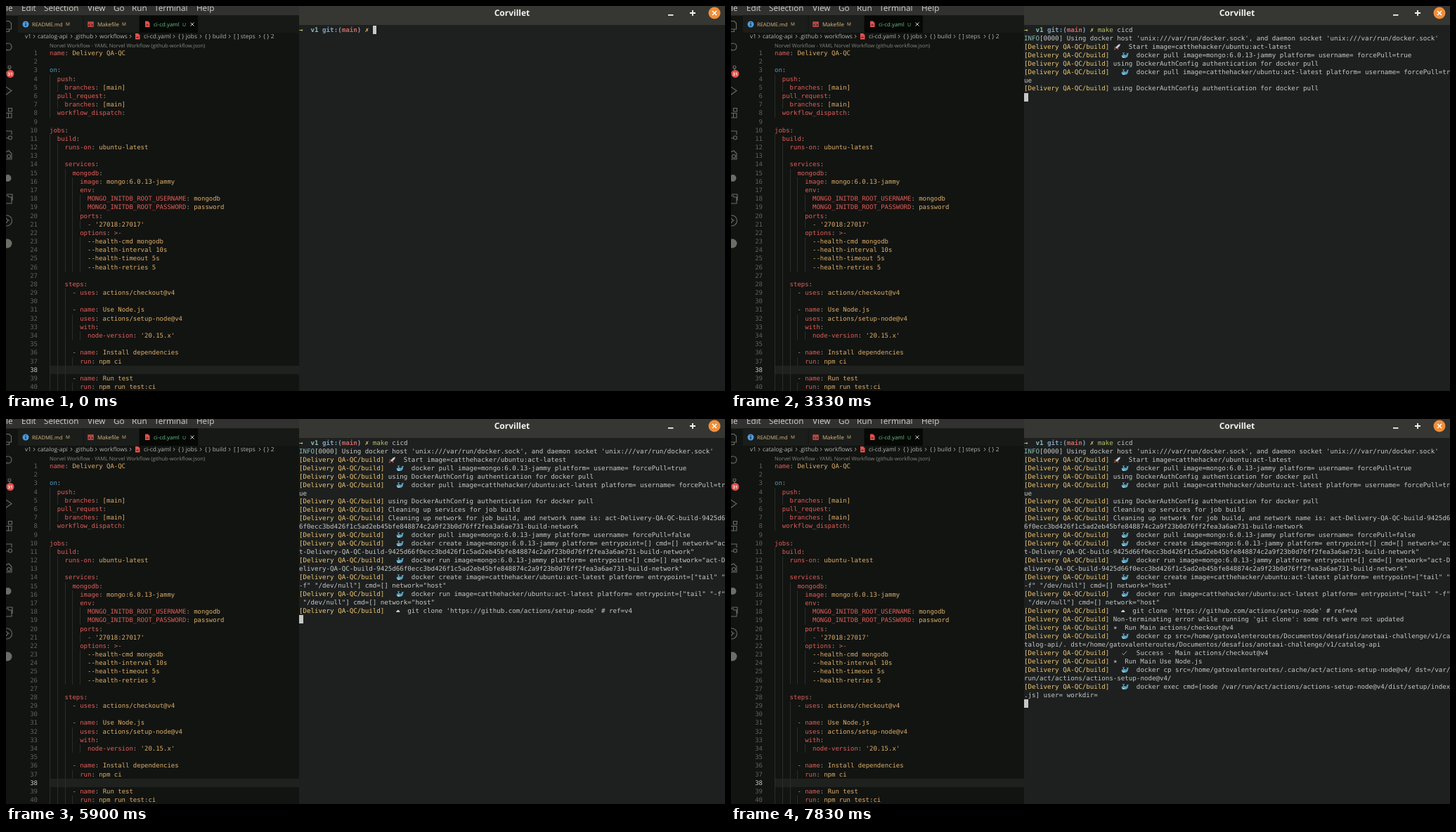
An HTML page for the animation above (8000 ms loop, 1023 px wide and 548 px high).

```html
<!DOCTYPE html>
<html lang="en">
<head>
<meta charset="utf-8">
<title>Terminal session</title>
<style>
html, body { margin: 0; width: 100%; height: 100%; overflow: hidden; background: #121411; }
body { position: relative; text-rendering: geometricPrecision; }
svg.chrome { position: absolute; left: 0; top: 0; font-family: "Open Sans", "Noto Sans", sans-serif; }
.mono { position: absolute; font-family: "DejaVu Sans Mono", monospace; font-variant-ligatures: none; white-space: pre; }
.mono div { position: absolute; white-space: pre; }

#editor { left: 0; top: 62.1px; width: 417px; height: 486px; overflow: hidden; font-size: 8.97px; line-height: 12.18px; color: #dcae6a; }
#editor .num { left: 0; width: 45px; text-align: right; color: #5f615b; }
#editor .num.on { color: #c8c8c4; }
#editor .line { left: 62px; height: 12.18px; }
#editor .hot { left: 62px; width: 355px; height: 12.18px; margin-top: -1px; background: #1f211e; }
#editor .guide { left: 62px; height: 12.3px; margin-top: -1px; background: repeating-linear-gradient(90deg, #2b2d2a 0 1px, transparent 1px 2ch); }
.key { color: #e05d5a; }
.bool { color: #4b97c4; }
.punct { color: #a0968c; }
.fold { color: #c0706e; }

#term { left: 417px; top: 27px; width: 606px; height: 521px; overflow: hidden; background: #1d201f; color: #c5c8c6; font-size: 9.174px; line-height: 11.97px; }
#term svg { height: 10px; vertical-align: -1.8px; overflow: visible; }
#cursor { width: 1ch; height: 11.97px; margin-top: -.8px; background: #c5c8c6; }
.green { color: #b5bd68; }
.cyan { color: #8abeb7; }
.blue { color: #81a2be; }
.red { color: #cc6666; }
.yellow { color: #f0c674; }
.ghost { color: #666; }
.under { color: #1d201f; }
</style>
</head>
<body>
<svg class="chrome" width="1023" height="548">
  <rect width="417" height="13.500" fill="#31322f"/>
  <g font-size="11.700" fill="#d2d2ce">
    <text x="0" y="7">le</text><text x="22" y="7">Edit</text><text x="54" y="7">Selection</text>
    <text x="116" y="7">View</text><text x="153" y="7">Go</text><text x="179" y="7">Run</text>
    <text x="211" y="7">Terminal</text><text x="271" y="7">Help</text>
  </g>

  <rect x="17" y="13.500" width="400" height="24.500" fill="#171916"/>
  <rect x="17" y="13.500" width="172" height="24.500" fill="#1b1d1a"/>
  <path d="M110 14v24M189.500 14v24" stroke="#121411"/>
  <rect x="190" y="13.500" width="83" height="24.500" fill="#050805"/>
  <g font-size="7.900" fill="#d9b982">
    <text x="37" y="28.800" font-size="7.500">README.md</text><text x="85" y="28.300" font-size="6.500">M</text>
    <text x="130" y="28.800">Makefile</text><text x="165" y="28.300" font-size="6.500">M</text>
    <g fill="#6cc08a"><text x="210" y="28.800">ci-cd.yaml</text><text x="251" y="28.600" font-size="7">U</text></g>
  </g>
  <circle cx="28" cy="26" r="4.500" fill="#4a9be0"/>
  <path d="M28 25.200v3.300M28 23v1.200" stroke="#121411" stroke-width="1.200"/>
  <path d="M117 23h7v6h-7zM117 25h7M119 27h3" stroke="#d9534f" stroke-width="1.300" fill="none"/>
  <path d="M262.500 23.500l5 5m0-5l-5 5" stroke="#d0d0cc"/>
  <g fill="#e0504c">
    <path id="doc" d="M198 21.500h4l2.500 2.500v6h-6.500z"/>
    <use href="#doc" transform="translate(-14 17.500)"/>
  </g>
  <path d="M199.500 27h3M185.500 44.500h3" stroke="#121411"/>

  <g font-size="8.400" fill="#b4b5b0">
    <text x="27" y="46">v1</text><text x="45" y="46">catalog-api</text><text x="97" y="46">.github</text>
    <text x="133" y="46">workflows</text><text x="196" y="46">ci-cd.yaml</text><text x="245" y="46">{ } jobs</text>
    <text x="283" y="46">{ } build</text><text x="324" y="46">[ ] steps</text><text x="366" y="46">{ } 2</text>
  </g>
  <path d="M39 41l2 2.300-2 2.300M92 41l2 2.300-2 2.300M127 41l2 2.300-2 2.300M176 41l2 2.300-2 2.300M238 41l2 2.300-2 2.300M276 41l2 2.300-2 2.300M317 41l2 2.300-2 2.300M360 41l2 2.300-2 2.300" fill="none" stroke="#b4b5b0" stroke-width=".9"/>
  <text x="62" y="59.200" font-size="7.450" fill="#85877f">Norvel Workflow - YAML Norvel Workflow (github-workflow.json)</text>

  <g fill="none" stroke="#6b6d67" stroke-width="1.100">
    <path d="M-2 21.500h6.500l3 3v8.500h-9.500M4.500 33v3.500h-6"/>
    <circle cx="3" cy="58" r="5"/>
    <circle cx="5" cy="87" r="2"/><path d="M5 89v3l-6 3"/>
    <path d="M-1 114.500l9 6-9 6.500"/>
    <path d="M-1 152.500h9v6.500h-9M3.500 152v7M3.500 145.500h5v4.500h-5z"/>
    <path d="M-1 178h9v5M-1 188h4"/><circle cx="6" cy="187.500" r="2.500"/>
    <path d="M-1 208l5-2 4 4v8h-9"/><circle cx="4" cy="214" r="2.500"/>
    <path d="M-1 270h4l1 2h4v9h-9M1 268h8v9"/>
    <circle cx="1" cy="305.500" r="7.500"/><path d="M-1 301l4 4-4 5M3 305h2"/>
  </g>
  <g fill="#6b6d67"><circle cx="2.500" cy="245" r="5"/><circle cx="2" cy="338" r="6.500"/></g>
  <circle cx="6" cy="96.500" r="5.500" fill="#e0504c"/>
  <text x="6" y="98.800" font-size="6" font-weight="700" fill="#fff" text-anchor="middle">31</text>

  <rect x="417" width="606" height="27" fill="#363733"/>
  <text x="720" y="14.200" font-size="12" font-weight="700" fill="#f4f4f2" text-anchor="middle">Corvillet</text>
  <path d="M942 12.800h7.500M973 10h8M977 6v8" stroke="#f4f4f2" stroke-width="1.800"/>
  <circle cx="1008" cy="10" r="8.500" fill="#f08e3a"/>
  <path d="M1005 7l6 6m0-6l-6 6" stroke="#fff" stroke-width="1.600"/>
</svg>

<div id="editor" class="mono"></div>
<div id="term" class="mono"><div id="cursor"></div></div>

<script>
const yaml = `name: Delivery QA-QC

on:
  push:
    branches: [main]
  pull_request:
    branches: [main]
  workflow_dispatch:

jobs:
  build:
    runs-on: ubuntu-latest

    services:
      mongodb:
        image: mongo:6.0.13-jammy
        env:
          MONGO_INITDB_ROOT_USERNAME: mongodb
          MONGO_INITDB_ROOT_PASSWORD: password
        ports:
          - '27018:27017'
        options: >-
          --health-cmd mongodb
          --health-interval 10s
          --health-timeout 5s
          --health-retries 5

    steps:
      - uses: actions/checkout@v4

      - name: Use Node.js
        uses: actions/setup-node@v4
        with:
          node-version: '20.15.x'

      - name: Install dependencies
        run: npm ci

      - name: Run test
        run: npm run test:ci`.split('\n');

const tag = (cls, text) => text ? `<span class="${cls}">${text}</span>` : '';

function add(parent, cls, top, html = '') {
  const el = document.createElement('div');
  el.className = cls;
  el.style.top = top + 'px';
  el.innerHTML = html;
  parent.append(el);
  return el;
}

// Editor
const editor = document.getElementById('editor');
const indent = line => line.search(/\S/);
const HOT_LINE = 38;

function highlight(line) {
  const [, pad, dash, key, colon, rest] = line.match(/^( *)(- )?(?:([\w-]+)(:))?(.*)$/);
  return pad + tag('punct', dash) + tag(key === 'on' ? 'bool' : 'key', key) +
    tag('punct', colon) + (rest === ' >-' ? tag('fold', ' &gt;-') : rest);
}

yaml.forEach((line, i) => {
  const top = i * 12.18, hot = i + 1 === HOT_LINE;
  if (hot) add(editor, 'hot', top);
  add(editor, 'guide', top).style.width = indent(line || yaml[i + 1]) + 'ch';
  add(editor, hot ? 'num on' : 'num', top, i + 1);
  add(editor, 'line', top, highlight(line));
});

// Terminal
const COLS = 110, ROW = 11.97, TOP = 1.7, PROMPT = 19, LOOP = 8000;
const term = document.getElementById('term');
const cursor = document.getElementById('cursor');
const job = '[Delivery QA-QC/build] ';
const whale = job + '  🐳  docker ';
const net = 'act-Delivery-QA-QC-build-9425d66f0ecc3bd426f1c5ad2eb45bfe848874c2a9f23b0d76ff2fea3a6ae731-build-network';
const mongo = 'image=mongo:6.0.13-jammy platform=';
const ubuntu = 'image=catthehacker/ubuntu:act-latest platform=';
const home = '/home/gatovalenteroutes';
const repo = home + '/Documentos/desafios/anotaai-challenge/v1/catalog-api';
const auth = job + 'using DockerAuthConfig authentication for docker pull';
const sock = "'unix:///var/run/docker.sock'";
const onNet = ` entrypoint=[] cmd=[] network="${net}"`;
const onHost = ' entrypoint=["tail" "-f" "/dev/null"] cmd=[] network="host"';

const log = [
  [1270, `INFO[0000] Using docker host ${sock}, and daemon socket ${sock}`],
  [1370, job + '🚀  Start image=catthehacker/ubuntu:act-latest'],
  [1370, whale + `pull ${mongo} username= forcePull=true`],
  [1370, auth],
  [3330, whale + `pull ${ubuntu} username= forcePull=true`],
  [3330, auth],
  [5030, job + 'Cleaning up services for job build'],
  [5070, job + 'Cleaning up network for job build, and network name is: ' + net],
  [5100, whale + `pull ${mongo} username= forcePull=false`],
  [5100, whale + 'create ' + mongo + onNet],
  [5170, whale + 'run ' + mongo + onNet],
  [5530, whale + 'create ' + ubuntu + onHost],
  [5600, whale + 'run ' + ubuntu + onHost],
  [5900, job + "  ☁  git clone 'https://github.com/actions/setup-node' # ref=v4"],
  [6430, job + "Non-terminating error while running 'git clone': some refs were not updated"],
  [6500, job + '⭐  Run Main actions/checkout@v4'],
  [6530, whale + `cp src=${repo}/. dst=${repo}`],
  [6800, job + '  ✅   Success - Main actions/checkout@v4'],
  [7000, job + '⭐  Run Main Use Node.js'],
  [7170, whale + `cp src=${home}/.cache/act/actions-setup-node@v4/ dst=/var/run/act/actions/actions-setup-node@v4/`],
  [7830, whale + 'exec cmd=[node /var/run/act/actions/actions-setup-node@v4/dist/setup/index.js] user= workdir=']
];

// Each icon fills as many cells as its string length
const icons = {
  '🚀': '<path d="M3 6L7 2l3-1-1 3-4 4z" fill="#c9cdd0"/><path d="M3 4.500L1 6l2 .5zM6 7.500V10l2-3zM2 7L.5 9.500 4 8.500z" fill="#c9564f"/>',
  '🐳': '<path d="M.5 5.500Q2 3.500 5 4q2.500 1.500 3.300-.5L7.500 2l1.500.3 2-.6-1 2q.2 5-4.500 5.200Q1 9 .5 5.500z" fill="#58a0bf"/><path d="M1 6.800q2 1 4.500.3-.7 1.600-2.200 1.600T1 6.800z" fill="#d5e4ea"/><path d="M3.500 3.800V2M2 2.200q.8-1.200 1.500 0 .8-1.200 1.600 0" fill="none" stroke="#a9cfe0" stroke-width=".8"/>',
  '☁': '<path d="M.5 7a1.300 1.300 0 0 1 .8-2 1.700 1.700 0 0 1 3.200 0A1.200 1.200 0 0 1 5 7z" fill="#c5c8c6"/>',
  '⭐': '<path d="M2.800 2.500l.7 1.800 1.800.1-1.400 1.100.5 1.900-1.600-1.100-1.600 1.100.5-1.900L.3 4.400l1.800-.1z" fill="#a0a39f"/>',
  '✅': '<path d="M1.500 5.500l2 2.300L8 2.500" fill="none" stroke="#9fb59a" stroke-width=".9"/>'
};

const format = row => row
  .replace(/^INFO/, tag('cyan', '$&'))
  .replace(/^\[Delivery.*?\]/, tag('yellow', '$&'))
  .replace(/🚀|🐳|☁|⭐|✅/gu, c => `<svg style="width:${c.length}ch">${icons[c]}</svg>`);

add(term, '', TOP, `<b>${tag('green', '→')}  ${tag('cyan', 'v1')} ${tag('blue', 'git:(')}` +
  `${tag('red', 'main')}${tag('blue', ')')} ${tag('yellow', '✗')}</b> <span id="cmd"></span>`);
const cmd = document.getElementById('cmd');

const rows = [];
for (const [time, text] of log)
  for (let i = 0; i < text.length; i += COLS)
    rows.push({ time, el: add(term, '', TOP + (rows.length + 1) * ROW, format(text.slice(i, i + COLS))) });

// Typed letters show the rest of the command as a suggestion until it is accepted
function command(typed) {
  const full = 'make cicd';
  if (!typed) return '';
  if (typed === full.length) return tag('green', 'make') + ' cicd';
  return `<b>${tag('red', full.slice(0, typed))}</b>` + tag('under', full[typed]) + tag('ghost', full.slice(typed + 1));
}

let lastTyped = -1;
function draw(t) {
  const typed = t < 500 ? 0 : t < 570 ? 1 : t < 630 ? 2 : t < 1000 ? 3 : 9;
  if (typed !== lastTyped) cmd.innerHTML = command(lastTyped = typed);
  let shown = 0;
  for (const { time, el } of rows) {
    const on = t >= time;
    el.style.visibility = on ? 'visible' : 'hidden';
    shown += on;
  }
  const sent = t >= 1200;
  cursor.style.left = (sent ? 0 : PROMPT + typed) + 'ch';
  cursor.style.top = TOP + (sent ? shown + 1 : 0) * ROW + 'px';
}

function tick() {
  draw(performance.now() % LOOP);
  requestAnimationFrame(tick);
}
tick();
</script>
</body>
</html>
```
